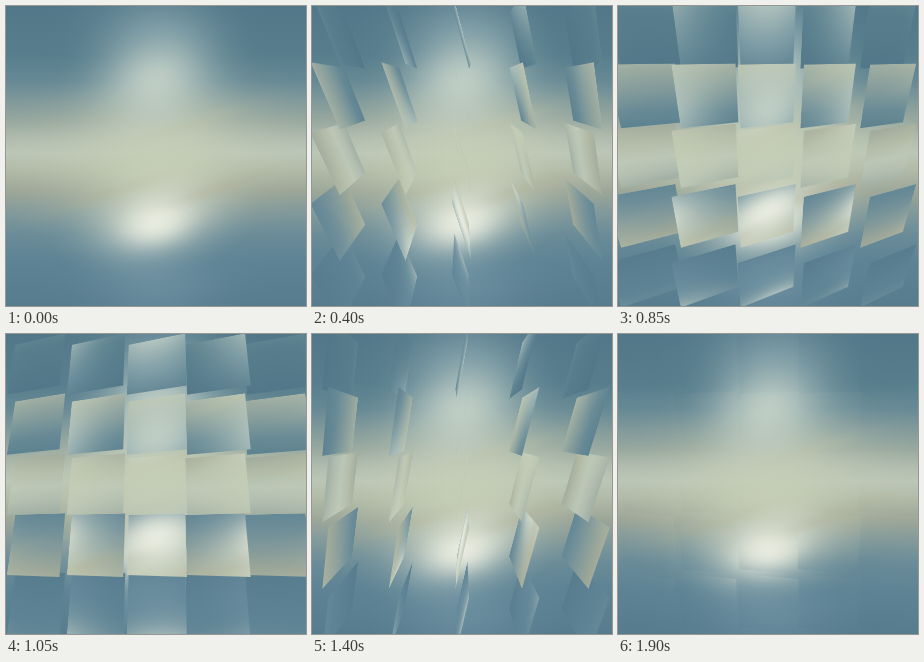
Animation, 300 px wide and 300 px high, one loop 1.95 s. Source, as an HTML page with a canvas:

```html
<!DOCTYPE html>
<html lang="en">
<head>
<meta charset="utf-8">
<title>Turning tiles</title>
<style>
  html, body { margin: 0; width: 100%; height: 100%; overflow: hidden; background: #587e8e; }
  #stage { position: relative; width: 300px; height: 300px; overflow: hidden; }
  #sky { position: absolute; left: 0; top: 0; }
  #grid { position: absolute; inset: 0; perspective: 240px; transform-style: preserve-3d; }
  #grid canvas { position: absolute; }
</style>
</head>
<body>
<div id="stage">
  <canvas id="sky" width="300" height="300"></canvas>
  <div id="grid"></div>
</div>
<script>
const SIZE = 300, CELL = 60, STEP = 50, STEPS = 39;
const sky = document.getElementById('sky');
const grid = document.getElementById('grid');
const ctx = sky.getContext('2d');

// Vertical wash: [y, colour]
const wash = [
  [0, '#527788'], [50, '#587e8d'], [75, '#66899500'.slice(0, 7)], [95, '#80999a'],
  [115, '#98a89f'], [133, '#b0bcae'], [147, '#bbc6b7'], [163, '#b2bba8'],
  [185, '#9ca698'], [205, '#839a9a'], [228, '#6b8c98'], [255, '#5d8394'], [300, '#577c8e']
];

// Soft lights: x, y, radius x, radius y, tilt, colour, strength
const glows = [
  [150, 22, 120, 80, 0, '135,167,178', 0.45],
  [150, 278, 120, 70, 0, '130,162,177', 0.4],
  [150, 150, 175, 115, -0.2, '198,206,182', 0.85],
  [150, 75, 105, 88, -0.45, '202,214,203', 0.85],
  [150, 212, 110, 66, -0.25, '226,230,214', 0.85],
  [150, 218, 58, 36, -0.25, '242,243,232', 0.65],
  [95, 190, 110, 13, -0.3, '172,174,145', 0.22],
  [215, 182, 95, 14, -0.3, '176,174,148', 0.28],
  [185, 118, 110, 13, -0.3, '186,192,165', 0.25]
];

function glow([x, y, rx, ry, tilt, rgb, strength]) {
  const g = ctx.createRadialGradient(0, 0, 0, 0, 0, 1);
  for (let i = 0; i <= 16; i++) {
    const r = i / 16;
    const a = strength * Math.exp(-4 * r * r) * (1 - r ** 6);
    g.addColorStop(r, `rgba(${rgb},${a.toFixed(4)})`);
  }
  ctx.save();
  ctx.translate(x, y);
  ctx.rotate(tilt);
  ctx.scale(rx, ry);
  ctx.fillStyle = g;
  ctx.fillRect(-1, -1, 2, 2);
  ctx.restore();
}

function paintSky() {
  const g = ctx.createLinearGradient(0, 0, 0, SIZE);
  wash.forEach(([y, colour]) => g.addColorStop(y / SIZE, colour));
  ctx.fillStyle = g;
  ctx.fillRect(0, 0, SIZE, SIZE);
  glows.forEach(glow);
}

function cutTile(x, y) {
  const tile = document.createElement('canvas');
  tile.width = tile.height = CELL;
  tile.style.left = x + 'px';
  tile.style.top = y + 'px';
  tile.getContext('2d').drawImage(sky, x, y, CELL, CELL, 0, 0, CELL, CELL);
  grid.append(tile);
  return tile;
}

paintSky();
const tiles = [];
for (let y = 0; y < SIZE; y += CELL)
  for (let x = 0; x < SIZE; x += CELL) tiles.push(cutTile(x, y));

const start = performance.now();
let shown = -1;

function draw() {
  let step = Math.floor((performance.now() - start) / STEP) % STEPS;
  if (step < 2) step = 0; // rest flat for two steps
  if (step !== shown) {
    shown = step;
    const angle = 360 * step / STEPS;
    const turn = `rotateX(${angle}deg) rotateY(${angle}deg)`;
    tiles.forEach(tile => { tile.style.transform = turn; });
  }
  requestAnimationFrame(draw);
}
draw();
</script>
</body>
</html>
```
